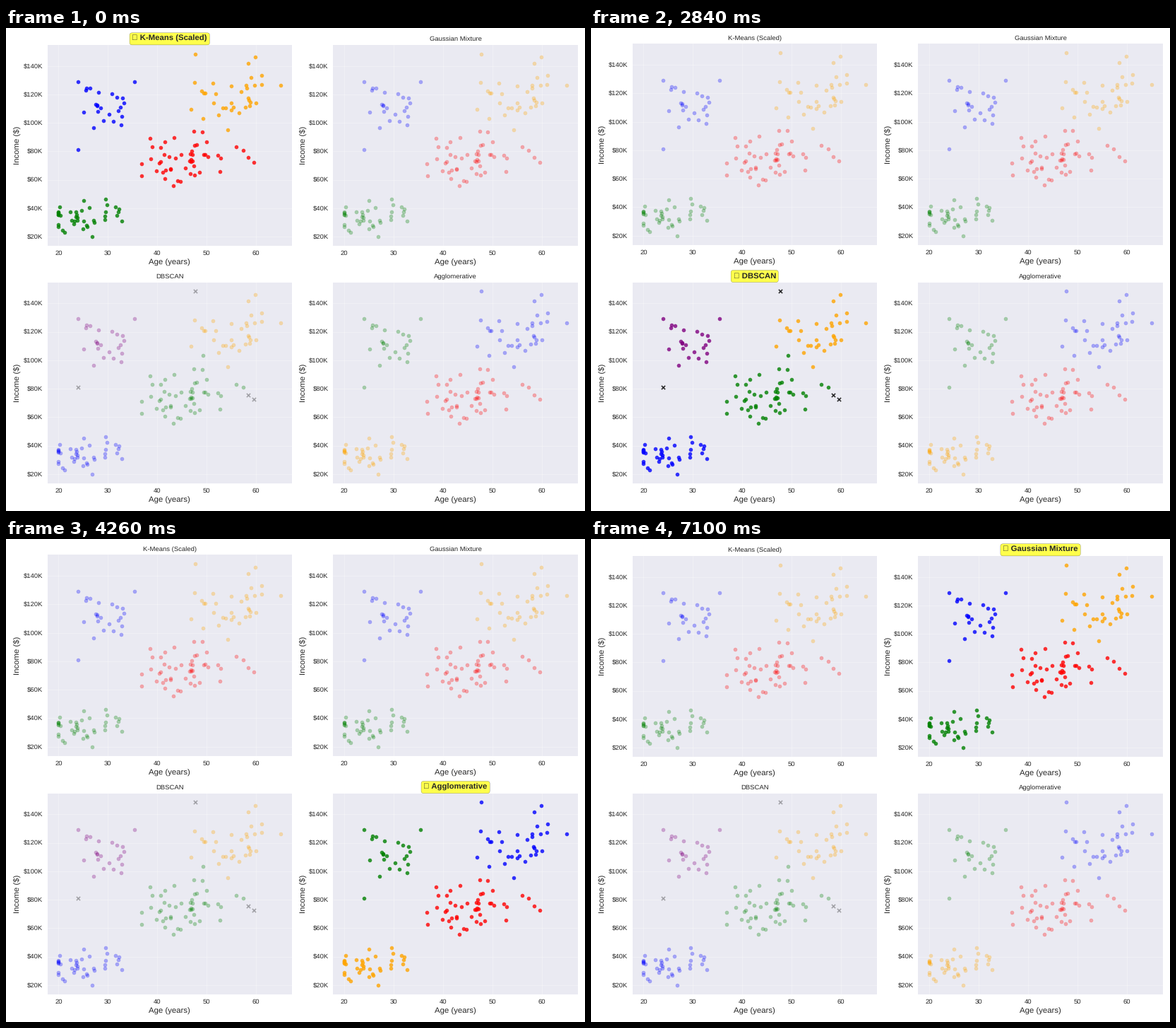
A matplotlib script for the animation above (8000 ms loop, 820 by 683 pixels).

```python
import numpy as np
import matplotlib.pyplot as plt
from matplotlib.animation import FuncAnimation

WIDTH, HEIGHT, DPI = 820, 683, 820 / 12
LOOP_MS, HOLD_MS, FRAMES = 8000, 1420, 62

plt.rcParams.update({
    "font.family": "Liberation Sans",
    "text.hinting": "no_hinting",
    "text.color": "0.15",
    "axes.facecolor": "#EAEAF2",
    "axes.linewidth": 0,
    "axes.labelcolor": "0.15",
    "axes.labelsize": 12,
    "axes.axisbelow": True,
    "grid.color": "white",
    "grid.linewidth": 1,
    "lines.linewidth": 1.75,
    "patch.linewidth": 0.3,
    "xtick.color": "0.15",
    "ytick.color": "0.15",
    "xtick.labelsize": 10,
    "ytick.labelsize": 10,
    "xtick.major.size": 0,
    "ytick.major.size": 0,
    "xtick.major.pad": 7,
    "ytick.major.pad": 7,
})

# count, mean age, mean income, age variance, covariance, income variance
SEGMENTS = [
    (40, 25, 35e3, 20, 5e3, 5e7),
    (50, 45, 75e3, 30, 8e3, 1e8),
    (35, 55, 120e3, 25, 10e3, 1.5e8),
    (25, 30, 110e3, 15, 6e3, 8e7),
]


def make_customers():
    rng = np.random.RandomState(42)
    parts = []
    for n, age, income, var_age, cov, var_income in SEGMENTS:
        z = rng.standard_normal((n, 2))
        sd = np.sqrt(var_income)
        slope = cov / sd
        rest = np.sqrt(var_age - slope ** 2)
        parts.append(np.column_stack([
            age + slope * z[:, 0] + rest * z[:, 1],
            income + sd * z[:, 0],
        ]))
    data = np.vstack(parts)
    return np.clip(data[:, 0], 20, 65), np.clip(data[:, 1], 20e3, 150e3)


ages, incomes = make_customers()
segment = np.repeat(np.arange(4), [s[0] for s in SEGMENTS])

# Density clustering leaves four outliers and moves one border point.
NOISE = 4
density = segment.copy()
density[102] = 1
density[[56, 89, 110, 131]] = NOISE

PANELS = [
    ("K-Means (Scaled)", segment, ["green", "red", "orange", "blue"]),
    ("Gaussian Mixture", segment, ["green", "red", "orange", "blue"]),
    ("DBSCAN", density, ["blue", "green", "orange", "purple", "black"]),
    ("Agglomerative", segment, ["orange", "red", "blue", "green"]),
]

# No font has this sign, so it shows as an empty box.
BADGE = "\U0001F3C6 "


def draw_panel(ax, labels, colors):
    dots = []
    for k, color in enumerate(colors):
        pick = labels == k
        marker = "x" if k == NOISE else "o"
        dots.append(ax.scatter(ages[pick], incomes[pick], c=color, s=30, marker=marker))
    ax.set_xlabel("Age (years)")
    ax.set_ylabel("Income ($)")
    ax.set_xticks(range(20, 61, 10))
    ax.set_yticks(range(20000, 140001, 20000))
    ax.yaxis.set_major_formatter(lambda v, pos: f"\\${v / 1000:.0f}K")
    ax.grid(True, alpha=0.3)
    return dots


def style_title(title, name, active):
    title.set_text(BADGE + name if active else name)
    title.set_fontsize(12 if active else 10)
    title.set_fontweight("bold" if active else "normal")
    title.set_bbox(dict(boxstyle="round,pad=0.3", facecolor="yellow", alpha=0.7)
                   if active else None)


fig, axes = plt.subplots(2, 2, figsize=(WIDTH / DPI, HEIGHT / DPI), dpi=DPI)
axes = axes.ravel()
panel_dots = [draw_panel(ax, labels, colors)
              for ax, (_, labels, colors) in zip(axes, PANELS)]


def update(frame):
    now = frame * LOOP_MS / FRAMES
    # Frames lie a few ms before each change, so round up slightly.
    current = int((now + 5) // HOLD_MS) % len(PANELS)
    for i, (ax, (name, _, _)) in enumerate(zip(axes, PANELS)):
        active = i == current
        style_title(ax.title, name, active)
        for dots in panel_dots[i]:
            dots.set_alpha(0.8 if active else 0.3)
    fig.tight_layout()
    return []


anim = FuncAnimation(fig, update, frames=FRAMES, interval=LOOP_MS / FRAMES,
                     repeat=True, repeat_delay=0, blit=False)
plt.show()
```
